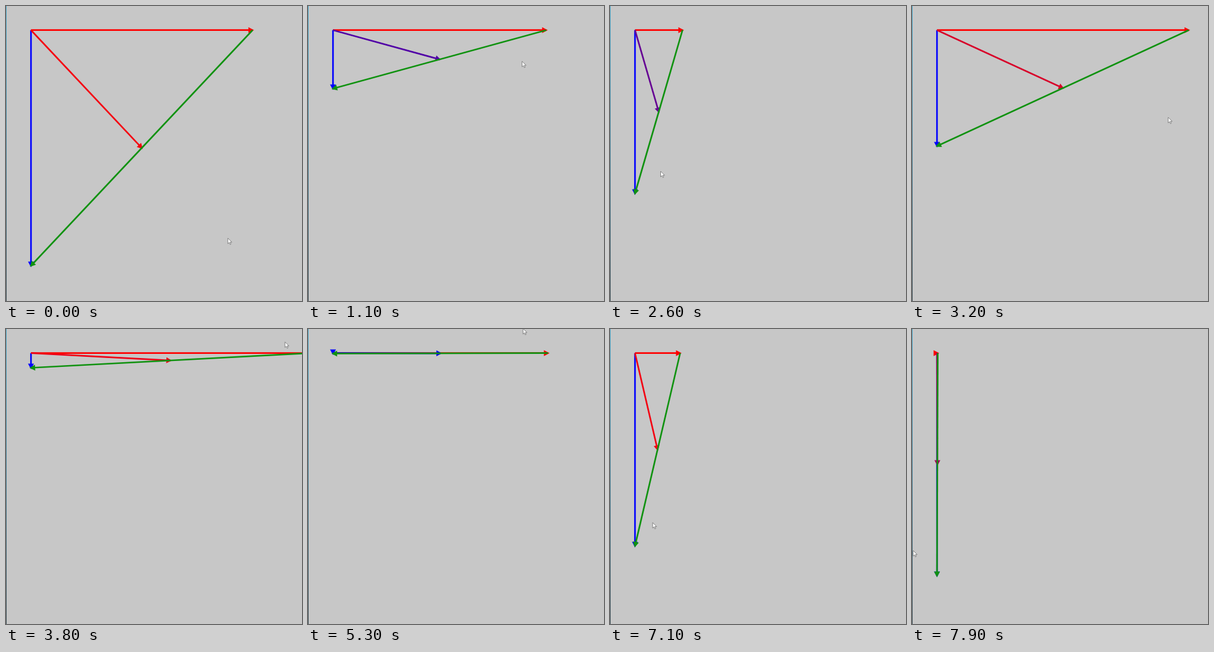
These frames come from a looping animation (500 by 498 pixels, 8000 ms). An HTML page:

```html
<!DOCTYPE html>
<html lang="en">
<head>
<meta charset="utf-8">
<title>Vector midpoint</title>
<style>
  html, body { margin: 0; width: 100%; height: 100%; overflow: hidden; background: #c7c7c7; }
  svg { display: block; width: 100vw; height: 100vh; }
</style>
</head>
<body>
<svg viewBox="0 0 500 498">
  <defs>
    <linearGradient id="edge" x1="0" y1="0" x2="0" y2="1">
      <stop offset="0" stop-color="#45a5c8"/>
      <stop offset=".5" stop-color="#3d7890"/>
      <stop offset="1" stop-color="#34454d"/>
    </linearGradient>
  </defs>
  <rect width="500" height="498" fill="#c7c7c7"/>
  <rect width="1" height="498" fill="url(#edge)"/>
  <g id="arrows"></g>
  <path id="cursor" d="M0 0V9.3L2.2 7.3L3.7 10.7L5.2 10L3.7 6.8H6.7Z"
        fill="#fff" stroke="#666" stroke-width=".8" stroke-linejoin="round"/>
</svg>
<script>
const LOOP = 8000, STEP = 100, TINT_PERIOD = 3600;
const ORIGIN = { x: 42.2, y: 40.7 };
// The drawn pointer runs slightly ahead of the vectors that follow it.
const POINTER = { lead: 15, dx: -41.5, dy: -42.5 };

// Turning points of the dragged corner, joined by a smooth curve.
const path = [
  { t: 0, x: 416.5, y: 438.5 },
  { t: 1100, x: 402.5, y: 139.5 },
  { t: 1400, x: 446, y: 90 },
  { t: 1800, x: 348, y: 62 },
  { t: 2300, x: 110, y: 180 },
  { t: 2600, x: 122.5, y: 316.5 },
  { t: 2850, x: 260, y: 362 },
  { t: 3300, x: 505, y: 200 },
  { t: 3800, x: 513.5, y: 65.5 },
  { t: 5300, x: 405.5, y: 41.5 },
  { t: 6300, x: 384, y: 101 },
  { t: 6500, x: 368.5, y: 200.5 },
  { t: 7200, x: 90, y: 384 },
  { t: 7900, x: 43.5, y: 416.5 }
];

function cornerAt(t) {
  const last = path.length - 1;
  let i = 0;
  while (i < last - 1 && t >= path[i + 1].t) i++;
  const a = path[i], b = path[i + 1], span = b.t - a.t;
  const before = path[Math.max(0, i - 1)], after = path[Math.min(last, i + 2)];
  const u = Math.min(1, (t - a.t) / span), u2 = u * u, u3 = u2 * u;
  const hermite = axis => {
    const slopeA = (b[axis] - before[axis]) / (b.t - before.t) * span;
    const slopeB = (after[axis] - a[axis]) / (after.t - a.t) * span;
    return a[axis] + (b[axis] - a[axis]) * (3 * u2 - 2 * u3)
      + slopeA * (u3 - 2 * u2 + u) + slopeB * (u3 - u2);
  };
  return { x: hermite("x"), y: hermite("y") };
}

const layer = document.getElementById("arrows");
const cursor = document.getElementById("cursor");

function makeArrow(color) {
  const add = (name, parent) =>
    parent.appendChild(document.createElementNS("http://www.w3.org/2000/svg", name));
  const group = add("g", layer);
  const shaft = add("path", group), head = add("path", group);
  shaft.setAttribute("stroke-width", 2.7);
  head.setAttribute("d", "M2.5 0L-7 -5V5Z");

  const paint = c => {
    group.setAttribute("stroke", c);
    head.setAttribute("stroke", "none");
    head.setAttribute("fill", c);
  };
  const place = (from, to) => {
    const angle = Math.atan2(to.y - from.y, to.x - from.x) * 180 / Math.PI;
    shaft.setAttribute("d", `M${from.x} ${from.y}L${to.x} ${to.y}`);
    head.setAttribute("transform", `translate(${to.x} ${to.y}) rotate(${angle})`);
  };
  paint(color);
  return { paint, place };
}

const across = makeArrow("#f00");
const down = makeArrow("#00f");
const middle = makeArrow("#f00");
const between = makeArrow("#109210");

function draw(t) {
  const corner = cornerAt(t);
  const right = { x: corner.x, y: ORIGIN.y };
  const bottom = { x: ORIGIN.x, y: corner.y };
  across.place(ORIGIN, right);
  down.place(ORIGIN, bottom);
  middle.place(ORIGIN, { x: (right.x + bottom.x) / 2, y: (right.y + bottom.y) / 2 });
  between.place(right, bottom);

  const blue = (1 - Math.cos(2 * Math.PI * t / TINT_PERIOD)) / 2;
  middle.paint(`rgb(${Math.round(245 * (1 - blue))},0,${Math.round(15 + 225 * blue)})`);

  const tip = cornerAt(t + POINTER.lead);
  cursor.setAttribute("transform", `translate(${tip.x + POINTER.dx} ${tip.y + POINTER.dy})`);
}

const start = performance.now();
function tick() {
  const t = (performance.now() - start) % LOOP;
  draw(Math.floor(t / STEP) * STEP);
  requestAnimationFrame(tick);
}
tick();
</script>
</body>
</html>
```
